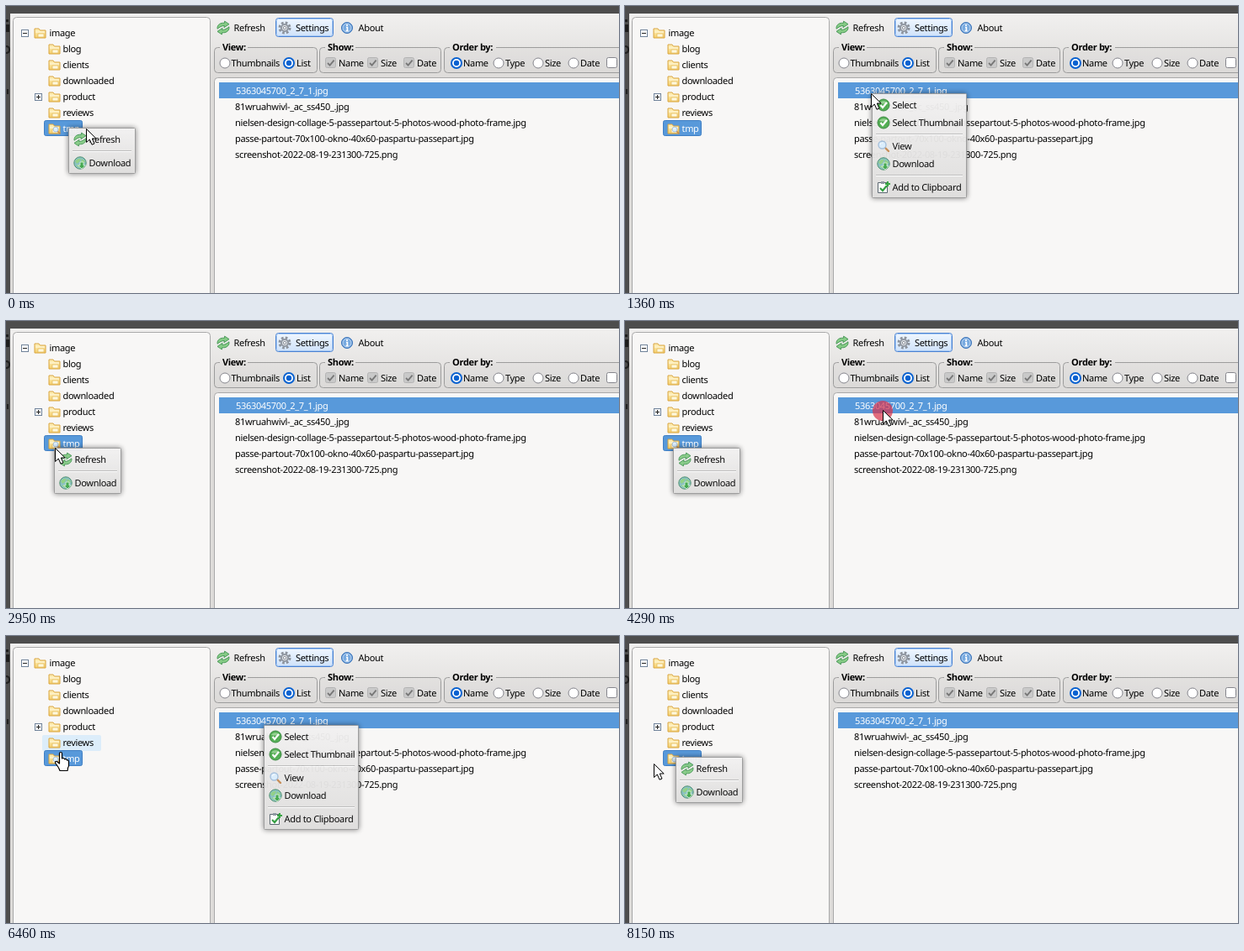
An HTML page that plays this animation: 728 px wide and 342 px high, repeating every 8180 ms.

```html
<!DOCTYPE html>
<html lang="en">
<head>
<meta charset="utf-8">
<title>File browser context menus</title>
<style>
  html, body { margin: 0; width: 100%; height: 100%; overflow: hidden; background: #4b4b4b; }
  svg { display: block; width: 728px; height: 342px; }
  text {
    font: 11px "Noto Sans", "Open Sans", sans-serif;
    letter-spacing: -.32px;
    text-rendering: geometricPrecision;
    white-space: pre;
  }
  .bold { font-weight: 700; }
  .shadow { filter: drop-shadow(0 0 3px rgba(0, 0, 0, .5)); }
</style>
</head>
<body>
<svg id="stage" viewBox="0 0 728 342">
  <defs>
    <linearGradient id="window" gradientUnits="userSpaceOnUse" x1="0" y1="9" x2="0" y2="86">
      <stop stop-color="#f1f0ef"/><stop offset="1" stop-color="#dddbd9"/>
    </linearGradient>
    <linearGradient id="grey" x2="0" y2="1"><stop stop-color="#f2f1f1"/><stop offset="1" stop-color="#dfdedd"/></linearGradient>
    <linearGradient id="button" x2="0" y2="1"><stop stop-color="#f0f7ff"/><stop offset="1" stop-color="#cfe2fa"/></linearGradient>
    <linearGradient id="yellow" x2="0" y2="1"><stop stop-color="#fff3c0"/><stop offset="1" stop-color="#f5cf6c"/></linearGradient>

    <g id="refresh">
      <g transform="rotate(-18)">
        <path id="half" d="M-7-1C-6-6-1-7 3-5L4-7 8-2 1 0 2-2C-1-3-4-2-7-1Z" fill="#86cb86" stroke="#3f9150" stroke-width=".8"/>
        <use href="#half" transform="rotate(180)"/>
      </g>
    </g>
    <g id="gear">
      <circle r="6" fill="none" stroke="#8c929b" stroke-width="3" stroke-dasharray="2.6 2.11"/>
      <circle r="4" fill="#eef0f3" stroke="#9299a3" stroke-width="2.2"/>
      <circle r="1.7" fill="#fff" stroke="#8b919a"/>
    </g>
    <g id="info">
      <circle r="6.5" fill="#5b95d5" stroke="#3d74b8"/>
      <circle r="5" fill="#78aae0" stroke="#d9e8f8" stroke-width=".8"/>
      <path d="M0-4V-2M-1-.5H.4V3.5M-1.4 3.5H1.6" stroke="#fff" stroke-width="1.6" fill="none"/>
    </g>
    <g id="folder">
      <path d="M-6.5 5.5V-5.5H-1.5L0-3.5H6.5V5.5Z" fill="url(#yellow)" stroke="#d9a43f"/>
      <path d="M-5.5-1.5H5.5" stroke="#fffae6"/>
      <path d="M-2.5.5H4.5V4.5H-2.5Z" fill="#fff8dc" stroke="#e3b95c" stroke-width=".7"/>
    </g>
    <g id="lens">
      <path d="M2 2 6 6" stroke="#c58a52" stroke-width="2.4" stroke-linecap="round"/>
      <circle cx="-1.5" cy="-1.5" r="4.5" fill="#d9edfd" stroke="#a3bedb" stroke-width="1.4"/>
      <path d="M-4-2Q-3-4-1-4" fill="none" stroke="#fff"/>
    </g>
    <g id="globe">
      <circle r="7.2" fill="#86bfc4" stroke="#4a8f6a"/>
      <path d="M-6-2Q-3-6 1-5L-1-1-4 1ZM2-5 6-2 4 2 1-1ZM-5 3-1 2 0 6Z" fill="#8fd084"/>
      <path d="M0-1H4V3H6.5L2 7-2.5 3H0Z" fill="#3fa64b" stroke="#e3f5e1" stroke-width=".8"/>
    </g>
    <g id="check">
      <circle r="7" fill="#4fae50" stroke="#3a8740"/>
      <path d="M-5-2A6 6 0 0 1 5-2Q0-1-5-2" fill="#93d08f"/>
      <path d="M-3.5 0-1 3 4-3" fill="none" stroke="#fff" stroke-width="2.2"/>
    </g>
    <g id="clipboard">
      <path d="M-6.5-5.5H4.5V6.5H-6.5Z" fill="#fff" stroke="#54616a"/>
      <path d="M-3-7H1V-4H-3Z" fill="#8a969e"/>
      <path d="M-4 1-1 4 4-2" fill="none" stroke="#2f9c3d" stroke-width="2.2"/>
      <path d="M5-7V-1M2-4H8" stroke="#31a33c" stroke-width="2"/>
    </g>
  </defs>

  <g id="backdrop"></g>
  <g id="hover"></g>
  <g id="content"></g>
  <g id="smallMenu" class="shadow"></g>
  <g id="bigMenu" class="shadow"></g>
  <circle id="click" r="12" fill="#d8304a"/>
  <path id="arrow" d="M.5.5V16.5L4.3 13 7 19.2 10 18 7.3 12H12.2Z" fill="#fff" stroke="#000"/>
  <path id="hand" fill="#fff" stroke="#000" stroke-width="1.2" stroke-linejoin="round"
    d="M-1.5 1C-1.5-1 1.5-1 1.5 1V7Q4 5.5 4.5 8 7 7 7.3 9 9.5 8.5 9.5 11V16Q8 18 8 21.5H-1Q-2 18-6 13C-7.5 10.5-5 9.5-3.5 11.5L-1.5 13Z"/>
</svg>

<script>
const $ = id => document.getElementById(id);
const text = (x, y, string, attrs = '') => `<text x="${x}" y="${y + 4}" ${attrs}>${string}</text>`;
const icon = (name, x, y) => `<use href="#${name}" x="${x}" y="${y}"/>`;
const rect = (x, y, w, h, fill, stroke = 'none', r = 0) =>
  `<rect x="${x}" y="${y}" width="${w}" height="${h}" rx="${r}" fill="${fill}" stroke="${stroke}"/>`;
const path = (d, stroke, width = 1) => `<path d="${d}" fill="none" stroke="${stroke}" stroke-width="${width}"/>`;

const radio = (x, on) =>
  `<circle cx="${x}" cy="68" r="6" fill="#fff" stroke="${on ? '#0a62d0' : '#85858c'}" stroke-width="${on ? 2 : 1}"/>` +
  (on ? `<circle cx="${x}" cy="68" r="3.2" fill="#0a62d0"/>` : '');
const tick = x => rect(x + .5, 61.5, 12, 12, '#c9c9c9', '#b4b4b4', 2) +
  path(`M${x + 3} 68l2.6 2.6 5-6`, '#777', 1.8);
// The border starts and ends beside the legend.
const fieldset = (x, w, legend, gap) => rect(x + .5, 49.5, w, 30, 'rgba(0,0,0,.015)', 'none', 4) +
  path(`M${x + 7} 49.5H${x + 4.5}q-4 0-4 4v22q0 4 4 4h${w - 8}q4 0 4-4v-22q0-4-4-4H${x + 7 + gap}`, '#9c9c9c') +
  text(x + 10, 49, legend, 'class="bold"');
const expander = (x, y, plus) => rect(x + .5, y - 4.5, 8, 8, '#fff', '#6f8299') +
  path(`M${x + 2} ${y - .5}h5` + (plus ? `M${x + 4.5} ${y - 3}v5` : ''), '#222');

const SELECTED = '#5899da';
const folders = ['blog', 'clients', 'downloaded', 'product', 'reviews', 'tmp'];
const files = ['5363045700_2_7_1.jpg', '81wruahwivl-_ac_ss450_.jpg',
  'nielsen-design-collage-5-passepartout-5-photos-wood-photo-frame.jpg',
  'passe-partout-70x100-okno-40x60-paspartu-passepart.jpg', 'screenshot-2022-08-19-231300-725.png'];

$('backdrop').innerHTML =
  rect(0, 0, 728, 342, '#4d4d4d') + rect(0, 22, 4, 9, '#1d1d1d') + rect(0, 16, 3, 3, '#1d1d1d') +
  path('M0 48q4 0 4 4t-4 4M3 100h-1v5', '#202020', 2) +
  rect(5, 9, 730, 340, 'url(#window)') +
  rect(8.5, 13.5, 234, 340, '#f8f7f6', '#a9a9a9', 4) +
  rect(247.5, 85.5, 500, 270, '#f8f7f6', '#a9a9a9', 4);

$('content').innerHTML =
  icon('refresh', 258, 26) + text(270.5, 26, 'Refresh') +
  rect(320.5, 14.5, 68, 22, 'url(#button)', '#4a82d2', 3) + rect(321.5, 15.5, 66, 20, 'none', '#a5c8f3', 2) +
  icon('gear', 331, 26) + text(344, 26, 'Settings') +
  icon('info', 405, 26) + text(418.5, 26, 'About') +
  fieldset(247, 122, 'View:', 33) + radio(260) + text(267.5, 68, 'Thumbnails') + radio(336, true) + text(345, 68, 'List') +
  fieldset(372, 144, 'Show:', 36) +
  [[379, 'Name'], [429, 'Size'], [472, 'Date']].map(([x, s]) => tick(x) + text(x + 16, 68, s)).join('') +
  fieldset(520, 230, 'Order by:', 55) +
  [[535, 'Name'], [585, 'Type'], [632, 'Size'], [674, 'Date']]
    .map(([x, s], i) => radio(x, !i) + text(x + 8, 68, s)).join('') +
  rect(713.5, 61.5, 12, 12, '#fff', '#85858c', 2) +
  expander(18, 33) + icon('folder', 40.5, 32.5) + text(51.5, 32, 'image') +
  expander(34, 109, true) + rect(45.5, 136.5, 45, 18, SELECTED, '#3f7fc4', 2) +
  folders.map((name, i) => icon('folder', 57.5, 51.5 + 19 * i) +
    text(67.5, 51 + 19 * i, name, i == 5 ? 'fill="#fff"' : '')).join('') +
  `<use href="#lens" transform="translate(60 148) scale(.65)"/>` +
  rect(253, 91, 480, 19, SELECTED) +
  files.map((name, i) => text(i ? 272 : 273, 101 + 19 * i, name, i ? '' : 'fill="#fff"')).join('');

function menu(width, height, separators, items) {
  return rect(.5, .5, width - 1, height - 1, 'url(#grey)', '#9a9a9a', 1) +
    separators.map(y => path(`M5 ${y - .5}H${width - 5}`, '#bcbcbc') + path(`M5 ${y + .5}H${width - 5}`, '#fff')).join('') +
    items.map(([y, name, label]) => icon(name, 14, y) + text(24.5, y, label)).join('');
}
$('smallMenu').innerHTML = menu(80, 55, [28], [[14, 'refresh', 'Refresh'], [42, 'globe', 'Download']]);
$('bigMenu').innerHTML = menu(113, 125, [49, 98], [
  [14, 'check', 'Select'], [35, 'check', 'Select Thumbnail'], [63, 'lens', 'View'],
  [84, 'globe', 'Download'], [112, 'clipboard', 'Add to Clipboard']]);

// Pointer moves: start, end, x, y; equal times are jumps.
const LOOP = 8180;
const moves = [
  [0, 0, 95, 146], [0, 540, 294, 104], [1360, 1360, 292, 104], [1530, 1530, 290, 104],
  [1640, 2070, 51, 156], [2340, 2340, 58, 151], [3120, 3520, 285, 25], [3730, 4060, 306, 106],
  [5720, 5720, 299, 110], [6060, 6460, 65, 139], [6460, 6550, 59, 144],
  [7620, 7620, 60, 145], [7960, 8150, 34, 152]];
// Menus: element, x, y, appears, fade start, fade end, disappears.
const popups = [
  ['smallMenu', 74, 145, 0, -2, -1, 510], ['bigMenu', 293, 104, 780, 780, 1120, 2540],
  ['smallMenu', 57, 151, 2600, 2600, 2950, 4320], ['bigMenu', 306, 106, 4320, 4460, 4810, 6750],
  ['smallMenu', 60, 144, 6880, 6880, 7220, LOOP]];
const clicks = [[4290, 306, 107], [6720, 60, 145]];

function swing(t, from, to) {
  if (t >= to) return 1;
  return t <= from ? 0 : .5 - Math.cos(Math.PI * (t - from) / (to - from)) / 2;
}

function pointerAt(t) {
  let x = 0, y = 0;
  for (const [from, to, nextX, nextY] of moves) {
    if (t < from) break;
    const p = swing(t, from, to);
    x += (nextX - x) * p;
    y += (nextY - y) * p;
  }
  return [x, y];
}

function hoverAt(x, y) {
  if (x > 253 && y > 112 && y < 186) return rect(253, 91 + 19 * Math.floor((y - 91) / 19), 480, 19, '#ddeefb');
  if (x > 43 && x < 113 && y > 118 && y < 140) return rect(43, 118, 70, 19, '#dcedfa', 'none', 2);
  return '';
}

function place(id, x, y, opacity) {
  $(id).setAttribute('transform', `translate(${x} ${y})`);
  $(id).setAttribute('opacity', opacity);
}

function draw(now) {
  const t = now % LOOP;
  const [x, y] = pointerAt(t).map(Math.round);
  const item = hoverAt(x, y);
  const overButton = x > 247 && x < 315 && y > 14 && y < 37;
  $('hover').innerHTML = item + (overButton ? rect(247.5, 14.5, 67, 22, '#f7fafd', '#9bbbe3', 3) : '');
  place('arrow', x, y, item ? 0 : 1);
  place('hand', x, y, item ? 1 : 0);

  place('smallMenu', 0, 0, 0);
  place('bigMenu', 0, 0, 0);
  for (const [id, left, top, shown, from, to, hidden] of popups)
    if (t >= shown && t < hidden) place(id, left, top, .06 + .9 * swing(t, from, to));

  const click = clicks.find(([start]) => t >= start && t < start + 30);
  place('click', click ? click[1] : 0, click ? click[2] : 0, click ? .7 : 0);
}

const start = performance.now();
(function frame() {
  draw(performance.now() - start);
  requestAnimationFrame(frame);
})();
</script>
</body>
</html>
```
